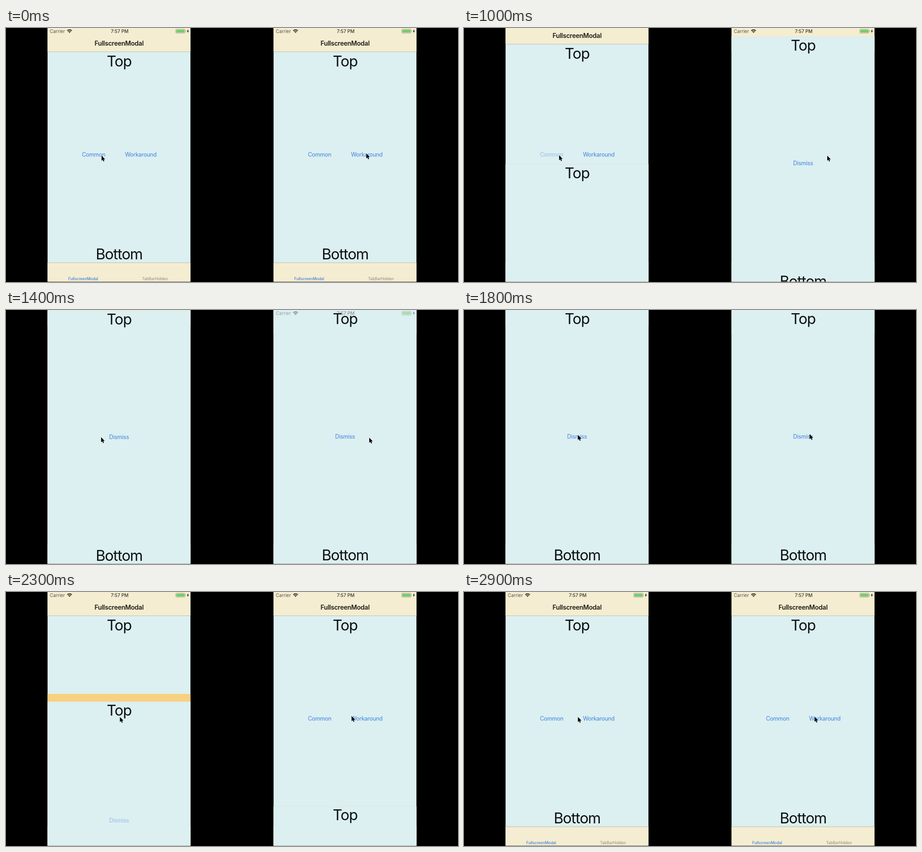
Write an HTML page that moves like this. It is 998x561 px and loops after 3 s.

```html
<!DOCTYPE html>
<html lang="en">
<head>
<meta charset="utf-8">
<title>Modal presentation</title>
<style>
  html, body { margin: 0; width: 100%; height: 100%; overflow: hidden; background: #000; }
  svg { display: block; width: 100%; height: 100%; }
  text { font-family: Inter, Roboto, sans-serif; font-optical-sizing: none; text-anchor: middle; }
  .big { font-size: 32.6px; letter-spacing: -.035em; fill: #0c1011; }
  .title { font-size: 14.1px; font-weight: 600; letter-spacing: -.02em; fill: #1b1a16; }
  .link { font-size: 12.4px; letter-spacing: -.018em; fill: #3f82dd; }
  .tab { font-size: 8.4px; font-weight: 500; fill: #9b978b; }
  .tab.on { fill: #3f82dd; }
  .carrier { font-size: 10.2px; text-anchor: start; fill: #55534a; }
  .time { font-size: 10.2px; font-weight: 500; fill: #38362f; }
  .sky { fill: #dceff1; }
  .cream { fill: #f5edd1; }
  .line { fill: #bab9a9; }
  .amber { fill: #f8d180; }
</style>
</head>
<body>
<svg viewBox="0 0 998 561">
  <defs>
    <clipPath id="screen"><rect width="316" height="560.3"/></clipPath>
  </defs>
</svg>
<script>
const LOOP = 3000, STEP = 100, HEIGHT = 561, INSET = 17;

// Cursor paths: [time, x, y]
const phones = [
  {
    x: 91.5, link: 'common', press: [800, 900], dismiss: [2100, 2200],
    open: 955, close: 2263, compact: [1000, 2300], insetFrom: 2300,
    status: t => t < 1000 || t >= 2300 ? 1 : 0,
    path: [[0, 211, 282], [300, 210, 281], [1400, 210, 281], [1600, 216, 280],
           [1700, 236, 277.5], [1800, 251.5, 276]]
  },
  {
    x: 590.5, link: 'workaround', press: [500, 700], dismiss: [2000, 2100],
    open: 755, close: 2166, compact: [LOOP, LOOP], insetFrom: LOOP,
    status: t => t >= 2200 ? 1 : clamp((1600 - t) / 400),
    path: [[0, 795.5, 277], [300, 802, 282], [1400, 802, 282], [1600, 791, 279],
           [1700, 774, 276], [1800, 763, 274], [2500, 763, 274], [2900, 774, 275.5]]
  }
];

const text = (cls, x, y, label) => `<text class="${cls}" x="${x}" y="${y}">${label}</text>`;
const rect = (cls, y, h) => `<rect class="${cls}" y="${y}" width="316" height="${h}"/>`;

const statusBar = `
  <g class="status">
    ${text('carrier', 5.3, 10.7, 'Carrier')}
    <g transform="translate(48.8 10.6)" fill="none" stroke="#1d1c18" stroke-width="1.7">
      <path d="M-5.2-4.6a7.4 7.4 0 0 1 10.4 0M-3.3-2.5a4.7 4.7 0 0 1 6.6 0"/>
      <path d="M0 .3L-1.7-1.4a2.4 2.4 0 0 1 3.4 0z" fill="#1d1c18" stroke="none"/>
    </g>
    ${text('time', 159.5, 10.7, '7:57 PM')}
    <rect x="283.3" y="2.6" width="20.6" height="8.8" rx="2" fill="none" stroke="#8b8a7c" stroke-width=".8"/>
    <rect x="284.6" y="3.9" width="18" height="6.2" rx="1" fill="#6fce68"/>
    <path d="M305 5.4q1.6 1.6 0 3.2z" fill="#8b8a7c"/>
    <path d="M311 2.8L307.6 7.6H309.8L308.9 11.2L312.4 6.3H310.2z" fill="#1d1c18"/>
  </g>`;

const phoneMarkup = p => `
  <g transform="translate(${p.x} 0)" clip-path="url(#screen)">
    ${rect('sky', 0, HEIGHT)}
    ${text('big', 158.2, 511, 'Bottom')}
    ${text('link common', 102, 284, 'Common')}
    ${text('link workaround', 206, 284, 'Workaround')}
    <g class="header">
      ${rect('cream', -20, 72)}${rect('line', 52, .9)}
      ${text('title', 158.2, 38.7, 'FullscreenModal')}
      ${text('big', 158.2, 84.5, 'Top')}
    </g>
    ${rect('cream', 518, 43)}${rect('line', 518, .9)}
    ${text('tab on', 79, 557, 'FullscreenModal')}
    ${text('tab', 237.5, 557, 'TabBarHidden')}
    <g class="modal">
      ${rect('amber', 0, HEIGHT)}
      <g class="content">
        ${rect('sky', 0, HEIGHT)}
        ${text('big', 158.2, 31, 'Top')}
      </g>
      ${text('link dismiss', 158.2, 284, 'Dismiss')}
      ${text('big', 158.2, 552.5, 'Bottom')}
    </g>
    ${statusBar}
  </g>
  <path class="cursor" d="M0 0V11.2L2.6 8.9L4.3 12.9L6.2 12.1L4.5 8.2H8z"
    stroke="#fff" stroke-opacity=".8" stroke-width="1" paint-order="stroke"/>`;

const svg = document.querySelector('svg');
for (const p of phones) {
  p.node = document.createElementNS('http://www.w3.org/2000/svg', 'g');
  p.node.innerHTML = phoneMarkup(p);
  svg.append(p.node);
  p.find = cls => p.node.querySelector('.' + cls);
}

function clamp(v) { return Math.min(1, Math.max(0, v)); }

// Share of the way still to go, falling to a quarter every 100 ms
const remaining = ms => ms < 0 ? 1 : 4 ** (-ms / 100);

const modalY = (p, t) =>
  HEIGHT * (t < p.close ? remaining(t - p.open) : 1 - remaining(t - p.close));

function pressAlpha([down, up], t) {
  if (t < down) return 1;
  return clamp(.2 + Math.max(0, t - up) / 400);
}

function along(path, t) {
  const i = path.findIndex(k => k[0] > t);
  if (i < 0) return path[path.length - 1].slice(1);
  const [a, b] = [path[i - 1], path[i]];
  const f = (t - a[0]) / (b[0] - a[0]);
  return [1, 2].map(n => a[n] + (b[n] - a[n]) * f);
}

const move = (el, x, y) => el.setAttribute('transform', `translate(${x} ${y})`);

function draw(p, t) {
  const compact = t >= p.compact[0] && t < p.compact[1];
  move(p.find('header'), 0, compact ? -INSET : 0);
  move(p.find('modal'), 0, modalY(p, t));
  move(p.find('content'), 0, t >= p.insetFrom ? INSET : 0);
  move(p.find('cursor'), ...along(p.path, t));
  p.find('status').setAttribute('opacity', p.status(t));
  p.find(p.link).setAttribute('opacity', pressAlpha(p.press, t));
  p.find('dismiss').setAttribute('opacity', pressAlpha(p.dismiss, t));
}

const start = performance.now();
function tick() {
  const t = Math.floor((performance.now() - start) % LOOP / STEP) * STEP;
  phones.forEach(p => draw(p, t));
  requestAnimationFrame(tick);
}
tick();
</script>
</body>
</html>
```
